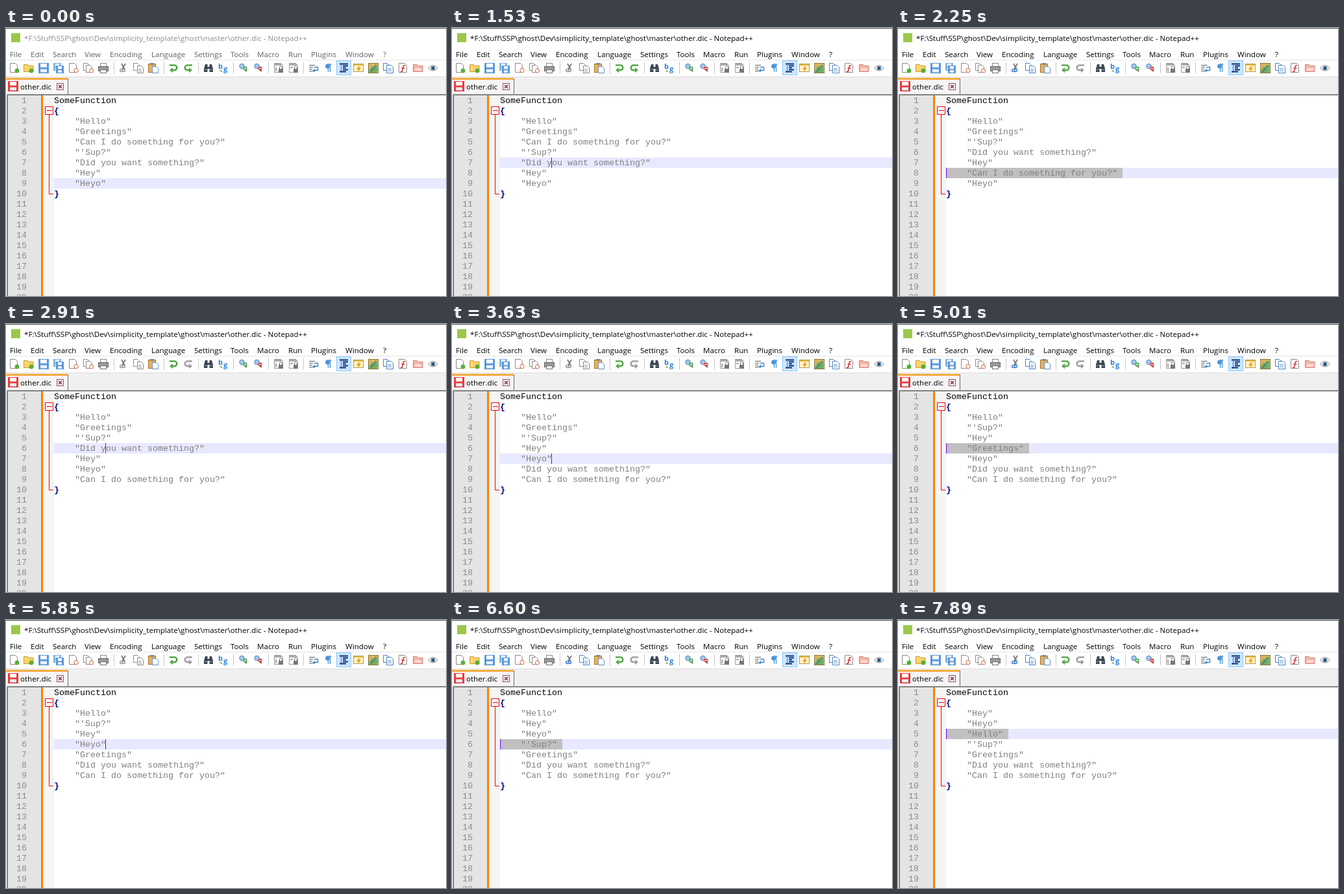
Animation of 678 by 414 pixels, one loop 8 s. Source, as an HTML page:

```html
<!DOCTYPE html>
<html lang="en">
<head>
<meta charset="utf-8">
<title>Moving lines in an editor</title>
<style>
  html, body { margin: 0; width: 100%; height: 100%; overflow: hidden; background: #fff; }
  svg { display: block; }
  .ui { font: 11.6px "Open Sans", "Noto Sans", sans-serif; }
  .code { font: 13.333px "Liberation Mono", monospace; }
  .str { fill: #808080; }
  .num { fill: #8e8e8e; text-anchor: end; }
  .brace { fill: #000080; font-weight: bold; }
  .idle #title { fill: #8c8c8c; }
  .idle #menu { fill: #606060; }
  .picked .cutOff, .edited .redoOn,
  #stage:not(.picked) .cutOn, #stage:not(.edited) .redoOff { display: none; }
</style>
</head>
<body>
<svg id="stage" width="678" height="414" viewBox="0 0 678 414">
  <rect width="678" height="414" fill="#fff"/>
  <rect width="678" height="1" fill="#555"/>
  <rect x="8" y="8" width="14" height="14" fill="#9bc84b"/>
  <text id="title" class="ui" x="28" y="20">*F:\Stuff\SSP\ghost\Dev\simplicity_template\ghost\master\other.dic - Notepad++</text>
  <g id="menu" class="ui"></g>
  <rect y="49" width="678" height="1" fill="#e6e6e6"/>
  <g id="toolbar"></g>

  <rect y="75" width="678" height="28" fill="#f0f0f0"/>
  <rect y="75" width="678" height="1" fill="#dcdcdc"/>
  <rect y="77" width="95" height="25" fill="#f5f5f5"/>
  <rect y="77" width="95" height="3" fill="#faaa3c"/>
  <path d="M95.5 78V102" stroke="#696969"/>
  <g id="tabIcons"></g>
  <text class="ui" x="22" y="95">other.dic</text>

  <rect y="103" width="54" height="311" fill="#e4e4e4"/>
  <rect x="54" y="103" width="3" height="311" fill="#ff8000"/>
  <rect x="57" y="103" width="17" height="311" fill="#f5f5f5"/>
  <path d="M.5 414V80" stroke="#fff"/>
  <path d="M1.5 414V102.5H678" fill="none" stroke="#a0a0a0"/>
  <path d="M2.5 414V103.5H678" fill="none" stroke="#696969"/>
  <g id="numbers" class="code"></g>

  <rect id="current" x="74" width="604" height="16" fill="#e8e8ff"/>
  <rect id="selection" x="74" height="16" fill="#c0c0c0"/>
  <path d="M60.5 121.5h12v12h-12zM63 127.5h8M66.5 134V256.5H73" fill="none" stroke="#f00"/>
  <g class="code">
    <text x="74" y="116">SomeFunction</text>
    <text class="brace" x="74" y="132">{</text>
    <text class="brace" x="74" y="260">}</text>
    <g id="lines"></g>
  </g>
  <rect id="caret" width="1" height="16" fill="#8000ff"/>
  <path id="mouse" d="M-3 -7.5H-1Q0 -7.5 0 -6.5Q0 -7.5 1 -7.5H3M0 -6.5V6.5M-3 7.5H-1Q0 7.5 0 6.5Q0 7.5 1 7.5H3" fill="none" stroke="#000"/>
</svg>
<script>
const LOOP = 8000, ROW = 16, CHAR = 8, LEFT = 74, FIRST = 3, WISHED_COLUMN = 10;
const $ = id => document.getElementById(id);

// Menu and line numbers
const menu = [[6, 'File'], [38, 'Edit'], [72, 'Search'], [121, 'View'], [160, 'Encoding'],
  [224, 'Language'], [290, 'Settings'], [346, 'Tools'], [387, 'Macro'], [435, 'Run'],
  [470, 'Plugins'], [523, 'Window'], [581, '?']];
$('menu').innerHTML = menu.map(([x, label]) => `<text x="${x}" y="45">${label}</text>`).join('');
$('numbers').innerHTML = Array.from({ length: 20 }, (_, i) =>
  `<text class="num" x="32" y="${116 + ROW * i}">${i + 1}</text>`).join('');

// Icon parts, each drawn in a 16 x 16 cell
const box = (x, y, w, h, fill, line = 'none') =>
  `<rect x="${x}" y="${y}" width="${w}" height="${h}" fill="${fill}" stroke="${line}"/>`;
const dot = (x, y, r, fill, line = 'none') =>
  `<circle cx="${x}" cy="${y}" r="${r}" fill="${fill}" stroke="${line}"/>`;
const stroke = (d, color, width = 1) =>
  `<path d="${d}" fill="none" stroke="${color}" stroke-width="${width}"/>`;
const shape = (d, fill, line = 'none') => `<path d="${d}" fill="${fill}" stroke="${line}"/>`;
const letter = (x, y, char) =>
  `<text x="${x}" y="${y}" style="font:bold 11px 'Open Sans',sans-serif" fill="#2d7fd3">${char}</text>`;
const page = (x, y, w, h, line = '#8a8a8a') =>
  shape(`M${x} ${y}h${w - 3}l3 3v${h - 3}h${-w}z`, '#fff', line);
const folder = (fill, line) => shape('M.5 13.5V2.5h6l1.5 2h7v9z', fill, line);
const floppy = (x, y, s, color) => box(x + .5, y + .5, s - 1, s - 1, color, color) +
  box(x + 3, y + 1, s - 6, s * .36, '#fff') + box(x + 3, y + s * .6, s - 6, s * .3, '#e8f1fb');
const scissors = (blade, ring) => stroke('M5 1L10 10M11 1L6 10', blade, 1.8) +
  stroke('M6 10a2 2 0 1 0 .1 .1M10 10a2 2 0 1 0 .1 .1', ring, 1.6);
const copy = (line, mark) => page(.5, .5, 9, 11, line) + page(6.5, 4.5, 9, 11, line) +
  stroke('M8 9.5h5M8 11.5h5M8 13.5h5', mark);
const turn = color => stroke('M2 3.5H9.5a3.8 3.8 0 0 1 0 7.6H6', color, 2.6) +
  shape('M7 7v8.2L2 11.1z', color);
const mirrored = icon => `<g transform="matrix(-1 0 0 1 16 0)">${icon}</g>`;
const zoom = (color, mark) => stroke('M8 8L13 13', '#8a6b4d', 2.2) +
  dot(5.5, 5, 3.8, '#9fc5ee', '#5e87b5') + dot(10.5, 8.5, 3, color) + stroke(mark, '#fff');
const lockPage = mark => page(1.5, .5, 13, 14, '#999') + box(1, 1, 12, 3, '#aaa') +
  box(8, 9, 7, 6, '#777') + stroke('M9.5 9V7a2 2 0 0 1 4 0v2', '#777') + stroke(mark, '#888', 1.5);

const icons = [
  [13, page(1.5, .5, 11, 14) + dot(12, 12, 3.4, '#55b03a')],
  [35, folder('#fbd56b', '#c9973a') + dot(12, 12, 3.4, '#55b03a')],
  [58, floppy(0, 0, 16, '#5a96d8')],
  [81, floppy(0, 0, 12, '#86b2e4') + floppy(4, 4, 12, '#5a96d8')],
  [104, page(1.5, .5, 11, 14) + dot(12, 11.5, 3.2, '#fff', '#e05a35')],
  [127, page(.5, .5, 9, 11) + page(4.5, 3.5, 9, 11) + dot(12.5, 12, 3, '#fff', '#e05a35')],
  [150, box(3.5, .5, 9, 6, '#fff', '#888') + box(.5, 5.5, 15, 7, '#9a9a9a', '#666') +
    box(3.5, 10.5, 9, 5, '#eef4ff', '#777')],
  [181, scissors('#777', '#999'), 'cutOff'],
  [181, scissors('#777', '#3f80cf'), 'cutOn'],
  [204, copy('#888', '#aaa'), 'cutOff'],
  [204, copy('#4686cc', '#72a5dc'), 'cutOn'],
  [227, box(.5, 1.5, 11, 13, '#e8b35c', '#a87328') + box(3, 0, 6, 3, '#888') +
    page(6.5, 5.5, 9, 10, '#5b8fc9')],
  [258, turn('#58a848')],
  [281, mirrored(turn('#58a848')), 'redoOn'],
  [281, mirrored(turn('#a0a0a0')), 'redoOff'],
  [312, shape('M3 2h3.5v4h3V2H13l2 7v5H9.5V9h-3v5H1V9z', '#3c4654') +
    stroke('M2 10.5h4M10 10.5h4', '#8fa2ba')],
  [335, letter(0, 9, 'b') + letter(8, 13, 'g') + stroke('M2 11.5l3 2M5 13.5V10.5', '#55a040')],
  [366, zoom('#2c9d35', 'M8.5 8.5h4M10.5 6.5v4')],
  [389, zoom('#dc4040', 'M8.5 8.5h4')],
  [420, lockPage('M4 7v6')],
  [443, lockPage('M3 7h4')],
  [474, stroke('M1 3.5h9M1 6.5h6M1 9.5h5M1 12.5h7', '#555') +
    stroke('M9 6.5h5.5v5H9', '#3b82cf', 1.4) + shape('M10 8.5v6l-3-3z', '#3b82cf')],
  [497, dot(6.5, 5, 3.5, '#4f94dc') + stroke('M7.5 2V14M10.5 2V14M6.5 2h6', '#4f94dc', 1.4)],
  [521, box(-3.5, -3.5, 22, 22, '#cce8ff', '#90c8f6') +
    stroke('M1 1.5h13M6 4.5h8M6 7.5h5M6 10.5h8M1 13.5h10', '#10307c', 2) +
    stroke('M3.5 3V13', '#2b72d6')],
  [543, box(.5, 1.5, 15, 12, '#fff3c4', '#b99a55') + box(1, 2, 14, 2, '#e5b84b') +
    shape('M9 5L5 10h3l-1 4 5-6H9l2-3z', '#f09a24')],
  [566, box(.5, .5, 15, 15, '#d8b65b', '#8b7a42') + shape('M1 12L6 5l3 3 5-5v12H1z', '#6fae5a') +
    stroke('M4 14L12 3', '#4773a8', 1.5)],
  [589, page(.5, .5, 9, 11, '#4d82bd') + page(5.5, 3.5, 10, 12, '#4d82bd') +
    stroke('M7 8.5h6M7 10.5h6M7 12.5h6', '#7da9d9')],
  [612, page(1.5, .5, 12, 14) + stroke('M11 4Q8.5 3 8 6L6.5 13Q6 14 4 13M5.5 8h5', '#d9363c', 1.6)],
  [635, folder('#f5b5ab', '#d58378') + box(3, 8, 10, 4, '#fbd8d1')],
  [658, shape('M.5 8Q8 -.5 15.5 8Q8 16 .5 8z', '#fff', '#a58a70') + dot(8, 8, 3.6, '#5795cc') +
    dot(8, 8, 1.6, '#222')]
];
const separators = [166, 243, 296, 350, 404, 458];
$('toolbar').innerHTML =
  separators.map(x => stroke(`M${x + .5} 53V71`, '#c8c8c8')).join('') +
  icons.map(([x, art, mode = '']) =>
    `<g class="${mode}" transform="translate(${x - 8} 54)">${art}</g>`).join('');
$('tabIcons').innerHTML =
  `<g transform="translate(3 82)">${floppy(0, 0, 16, '#e53c3c')}</g>` +
  box(78.5, 85.5, 10, 10, '#f7eef2', '#8b5570') + stroke('M81 88l5 5M86 88l-5 5', '#7b3455', 1.6);

// Key presses: U puts the caret one line up, M moves the current line down and selects it
const startLines = ['Hello', 'Greetings', 'Can I do something for you?', "'Sup?",
  'Did you want something?', 'Hey', 'Heyo'].map(s => `"${s}"`);
const keys = [
  [1380, 'U'], [1530, 'U'], [1650, 'U'], [1770, 'U'],
  [1980, 'M'], [2130, 'M'], [2250, 'M'], [2370, 'M'],
  [2670, 'U'], [2760, 'U'], [2910, 'U'], [3270, 'M'], [3360, 'M'],
  [3630, 'U'], [4080, 'U'], [4440, 'U'], [4560, 'U'],
  [4860, 'M'], [5010, 'M'], [5550, 'M'],
  [5850, 'U'], [6000, 'U'], [6150, 'U'], [6450, 'M'], [6600, 'M'],
  [7050, 'U'], [7260, 'UU'], [7740, 'M'], [7890, 'M']
];
const FOCUS = 750, BLINK = [5370, 5550];

function stateAt(time) {
  const lines = [...startLines];
  let row = lines.length - 1, selected = false, edited = false;
  for (const [at, presses] of keys) {
    if (at > time) break;
    for (const key of presses) {
      selected = key === 'M';
      if (selected) {
        [lines[row], lines[row + 1]] = [lines[row + 1], lines[row]];
        row++;
        edited = true;
      } else row--;
    }
  }
  return { lines, row, selected, edited };
}

// The pointer comes in from the right, clicks, and leaves to the lower right
function mouseAt(time) {
  const along = (from, to, p) => from.map((v, i) => Math.round(v + (to[i] - v) * p));
  const rest = [430, 236];
  if (time < 60 || time >= 1050) return null;
  if (time < FOCUS) {
    const p = Math.min(1, (Math.floor((time - 60) / 36.4) + 1) / 15);
    return along([678, 99], rest, 1 - (1 - p) ** 2);
  }
  const p = Math.floor((time - FOCUS) / 37.5) / 8;
  return along(rest, [682, 342], p * p);
}

const lineNodes = startLines.map((_, i) => {
  const node = document.createElementNS('http://www.w3.org/2000/svg', 'text');
  node.setAttribute('class', 'str');
  node.setAttribute('x', LEFT + 4 * CHAR);
  node.setAttribute('y', 116 + ROW * (FIRST - 1 + i));
  return $('lines').appendChild(node);
});
const set = (id, attrs) => Object.entries(attrs).forEach(([k, v]) => $(id).setAttribute(k, v));
const show = (id, on) => set(id, { visibility: on ? 'visible' : 'hidden' });

function draw(time) {
  const { lines, row, selected, edited } = stateAt(time);
  const y = 104 + ROW * (FIRST - 1 + row);
  const end = lines[row].length + 4;
  const column = Math.min(WISHED_COLUMN, end);
  const mouse = mouseAt(time);
  const modes = { idle: time < FOCUS, picked: selected, edited };

  lineNodes.forEach((node, i) => {
    if (node.textContent !== lines[i]) node.textContent = lines[i];
  });
  Object.entries(modes).forEach(([name, on]) => $('stage').classList.toggle(name, on));
  set('current', { y });
  set('selection', { y, width: (end + 1) * CHAR });
  set('caret', { y, x: selected ? LEFT : LEFT + column * CHAR - 1 });
  show('selection', selected);
  show('caret', time >= FOCUS && !(time >= BLINK[0] && time < BLINK[1]));
  show('mouse', mouse);
  if (mouse) set('mouse', { transform: `translate(${mouse[0] + .5} ${mouse[1]})` });
}

const start = performance.now();
function tick() {
  draw((performance.now() - start) % LOOP);
  requestAnimationFrame(tick);
}
tick();
</script>
</body>
</html>
```
